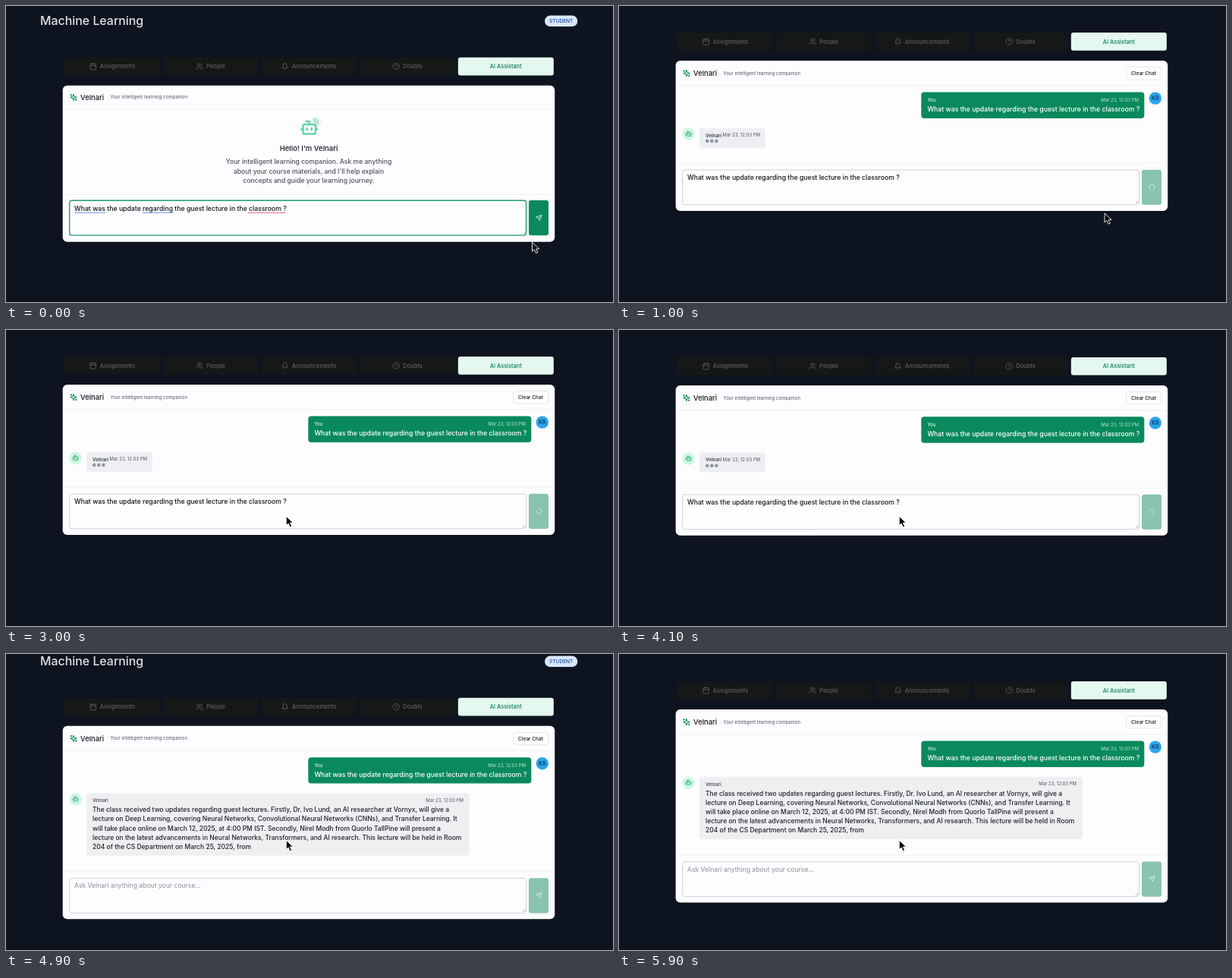
An HTML page that plays this animation: 800 px wide and 390 px high, repeating every 6000 ms.

```html
<!DOCTYPE html>
<html lang="en">
<head>
<meta charset="utf-8">
<title>Learning assistant</title>
<style>
  html, body { margin: 0; width: 100%; height: 100%; overflow: hidden; background: #0d141f; }
  svg { display: block; }
  text { font-family: Inter, "Open Sans", sans-serif; white-space: pre; }
  .icon { fill: none; stroke-linecap: round; stroke-linejoin: round; }
</style>
</head>
<body>
<svg id="stage" width="800" height="390" viewBox="0 0 800 390"></svg>
<script>
const LOOP = 6000, STEP = 100;
const SENT = 400, ANSWERED = 4800;
const BOT = "Velnari";
const DATE = "Mar 23, 12:03 PM";
const QUESTION = "What was the update regarding the guest lecture in the classroom ?";
const ANSWER = [
  "The class received two updates regarding guest lectures. Firstly, Dr. Ivo Lund, an AI researcher at Vornyx, will give a",
  "lecture on Deep Learning, covering Neural Networks, Convolutional Neural Networks (CNNs), and Transfer Learning. It",
  "will take place online on March 12, 2025, at 4:00 PM IST. Secondly, Nirel Modh from Quorlo TallPine will present a",
  "lecture on the latest advancements in Neural Networks, Transformers, and AI research. This lecture will be held in Room",
  "204 of the CS Department on March 25, 2025, from"
];

// Icon outlines on a 24 unit grid
const ICONS = {
  calendar: '<rect x="3" y="4" width="18" height="18" rx="2"/><path d="M16 2v4M8 2v4M3 10h18"/>',
  users: '<path d="M16 21v-2a4 4 0 0 0-4-4H6a4 4 0 0 0-4 4v2"/><circle cx="9" cy="7" r="4"/><path d="M22 21v-2a4 4 0 0 0-3-3.9M16 3.1a4 4 0 0 1 0 7.8"/>',
  bell: '<path d="M6 8a6 6 0 0 1 12 0c0 7 3 9 3 9H3s3-2 3-9M10.3 21a2 2 0 0 0 3.4 0"/>',
  help: '<circle cx="12" cy="12" r="10"/><path d="M9 9a3 3 0 0 1 5.8 1c0 2-2.8 3-2.8 3M12 17v.1"/>',
  bot: '<path d="M12 8V4H8M2 14h2M20 14h2M15 13v2M9 13v2"/><rect x="4" y="8" width="16" height="12" rx="2"/>',
  sparkles: '<path d="M12 3l-1.9 5.8a2 2 0 0 1-1.3 1.3L3 12l5.8 1.9a2 2 0 0 1 1.3 1.3L12 21l1.9-5.8a2 2 0 0 1 1.3-1.3L21 12l-5.8-1.9a2 2 0 0 1-1.3-1.3zM5 3v4M3 5h4M19 17v4M17 19h4"/>',
  send: '<path d="M22 2l-7 20-4-9-9-4zM22 2L11 13"/>',
  loader: '<path d="M21 12a9 9 0 1 1-6.2-8.6"/>'
};

const icon = (name, cx, cy, size, color, weight = 2) =>
  `<g class="icon" stroke="${color}" stroke-width="${weight}" transform="translate(${cx - size / 2} ${cy - size / 2}) scale(${size / 24})">${ICONS[name]}</g>`;

// y is the middle of the capital letters
const label = (x, y, str, size, color, weight = 500, anchor = "start") =>
  `<text x="${x}" y="${y + size * 0.36}" font-size="${size}" font-weight="${weight}" fill="${color}" text-anchor="${anchor}">${str}</text>`;

const box = (x, y, w, h, r, fill, stroke = "none", weight = 1) =>
  `<rect x="${x}" y="${y}" width="${w}" height="${h}" rx="${r}" fill="${fill}" stroke="${stroke}" stroke-width="${weight}"/>`;

const disc = (x, y, r, fill) => `<circle cx="${x}" cy="${y}" r="${r}" fill="${fill}"/>`;
const rule = (x, y, w, color, weight) =>
  `<path d="M${x} ${y}h${w}" stroke="${color}" stroke-width="${weight}"/>`;
const group = (id, body) => `<g id="${id}">${body}</g>`;

const tab = (x, name, title, iconX, textX) =>
  box(x, 68, 125, 23, 3, "#161717") +
  icon(name, iconX, 79.6, 10, "#5d6062") +
  label(textX, 79.6, title, 7.5, "#5d6062");

const panel = (height, headLine, footLine) =>
  box(74.7, -0.2, 648.5, height + 0.5, 6, "#fdfcfe") +
  rule(75.5, headLine, 647, "#eeeff2", 0.8) +
  rule(75.5, footLine, 647, "#eeeff2", 0.8);

const header = y =>
  icon("sparkles", 89, y, 11, "#0a8a5c", 2.2) +
  label(98, y, BOT, 9.4, "#14181f") +
  label(137.5, y, "Your intelligent learning companion", 6.1, "#4f5661", 400);

const inputBox = (y, stroke, weight, buttonColor) =>
  box(83.7, y, 601.8, 45.8, 3, "#fdfcfe", stroke, weight) +
  `<path d="M680.8 ${y + 44.3}l3.4-3.4M683 ${y + 44.3}l1.3-1.3" stroke="#777b80" stroke-width=".6"/>` +
  box(689, y - 0.2, 26, 46.2, 3, buttonColor);

const welcome =
  panel(205.5, 31, 143.5) + header(15.3) +
  disc(408.5, 47.5, 7, "#e8f8f0") +
  icon("bot", 399.7, 55.2, 25, "#62d3aa", 2.3) +
  icon("sparkles", 408.7, 47, 8.5, "#8fbfa5") +
  label(399, 82.7, `Hello! I'm ${BOT}`, 9.5, "#14181f", 500, "middle") +
  ["Your intelligent learning companion. Ask me anything",
   "about your course materials, and I'll help explain",
   "concepts and guide your learning journey."]
    .map((line, i) => label(399, 100.3 + 12.2 * i, line, 8.6, "#4b525e", 500, "middle")).join("") +
  inputBox(151.3, "#1d9f70", 1.4, "#0a8a5c") +
  label(90, 161.6, QUESTION, 8.7, "#111418") +
  rule(90, 167.4, 41, "#6f9fe0", 1) + rule(180, 167.4, 41, "#6f9fe0", 1) +
  rule(319, 167.4, 49, "#e0688c", 1) +
  icon("send", 702.3, 174.4, 8.5, "#fff");

const thread =
  header(16.3) +
  box(668.6, 8.4, 46.2, 16.2, 3, "#fefefe", "#dfe1e6", 0.8) +
  label(691.5, 16.4, "Clear Chat", 6.5, "#14181f", 500, "middle") +
  box(398.3, 41.2, 294, 34.4, 4, "#0a8a5c") +
  label(406.4, 51.4, "You", 6.1, "#e3f3ec") +
  label(685, 51.4, DATE, 6, "#c2e2d5", 400, "end") +
  label(406.4, 63.4, QUESTION, 8.7, "#fff") +
  disc(706.8, 49.3, 8.2, "#2ba5ec") +
  label(706.8, 49.3, "KR", 7, "#0f2c48", 500, "middle") +
  disc(91.7, 96.5, 8.2, "#cdf7e2") +
  icon("bot", 91.7, 96, 9, "#0d9a68");

const loading =
  panel(197.3, 32.6, 134.9) +
  box(106, 88.4, 87, 26, 4, "#eeeff2") +
  label(114, 98, BOT, 6.3, "#3c424c", 600) +
  label(136.5, 98, DATE, 6, "#4f5661", 400) +
  [0, 1, 2].map(i => group("dot" + i, disc(116.2 + 6.1 * i, 105.6, 2.3, "#9297a3"))).join("") +
  inputBox(143.7, "#cfd2d6", 1, "#88c4ae") +
  label(90, 153.6, QUESTION, 8.7, "#111418") +
  group("spinner", icon("loader", 702.3, 166.4, 9.2, "#e3f3ec"));

const answered =
  panel(254, 32.6, 191.9) +
  box(106, 88.4, 504.7, 82.2, 4, "#eeeff1") +
  label(114, 98, BOT, 6.3, "#3c424c") +
  label(603, 98, DATE, 6, "#4f5661", 400, "end") +
  ANSWER.map((line, i) => label(114, 110.2 + 12.2 * i, line, 8.5, "#1d2127")).join("") +
  inputBox(200.5, "#cfd2d6", 1, "#88c4ae") +
  label(90, 210.4, `Ask ${BOT} anything about your course...`, 8.6, "#8b909a", 400) +
  icon("send", 702.3, 223, 8.5, "#e9f6f0");

const pageTop =
  label(45, 18.9, "Machine Learning", 15.9, "#dfe2e6", 500) +
  box(710, 12.6, 43.3, 14.4, 7.2, "#d8e7fb") +
  label(731.7, 19.8, "STUDENT", 6.6, "#1d4f96", 500, "middle") +
  tab(77, "calendar", "Assignments", 114.7, 123.7) +
  tab(207, "users", "People", 255.3, 264.2) +
  tab(337, "bell", "Announcements", 367.6, 376.8) +
  tab(467, "help", "Doubts", 514.3, 523.3) +
  box(595.8, 67.8, 126, 23.6, 3, "#e5f8f0") +
  label(658.7, 79.6, "AI Assistant", 7.4, "#0a7f56", 500, "middle");

const pointer = '<path d="M0 0v12.2l2.8-2.6 2.2 4.7 2.3-1-2.2-4.6h4z" fill="#050505" stroke="#fff" stroke-width=".9" stroke-linejoin="round"/>';

const stage = document.getElementById("stage");
stage.innerHTML =
  group("page", pageTop + `<g transform="translate(0 105)">` +
    group("welcome", welcome) + group("loading", loading) +
    group("answered", answered) + group("thread", thread) + "</g>") +
  group("pointer", pointer);
const el = id => document.getElementById(id);

// [time, value...]
const SCROLL = [
  [0, 0], [400, 0], [500, -4.5], [600, -13.6], [700, -32.7], [3500, -32.7], [4200, -31.7],
  [4300, -27], [4400, -20], [4500, -15.3], [4700, -11.5], [4900, -10],
  [5000, -14], [5100, -22], [5200, -30.5], [5400, -30.5], [5900, -31.7]
];
const POINTER = [
  [0, 693.5, 311.3], [300, 704, 280], [400, 706, 276.5], [600, 706.5, 276.3], [800, 705, 280],
  [1000, 640, 273], [1200, 480, 258], [1400, 386, 248], [1600, 369.3, 245.4]
];

function at(track, t) {
  const i = track.findIndex(key => key[0] > t);
  if (i < 0) return track[track.length - 1].slice(1);
  const [a, b] = [track[i - 1], track[i]];
  const k = (t - a[0]) / (b[0] - a[0]);
  return a.slice(1).map((v, n) => v + (b[n + 1] - v) * k);
}

const move = (id, x, y) => el(id).setAttribute("transform", `translate(${x} ${y})`);
const show = (id, on) => el(id).setAttribute("display", on ? "inline" : "none");

function draw(t) {
  move("page", 0, at(SCROLL, t)[0]);
  move("pointer", ...at(POINTER, t));
  show("welcome", t < SENT);
  show("loading", t >= SENT && t < ANSWERED);
  show("thread", t >= SENT);
  show("answered", t >= ANSWERED);

  const beat = (t % 1000) / 1000;
  for (let i = 0; i < 3; i++) {
    const off = Math.abs(beat - 0.56 + 0.1 * i);
    move("dot" + i, 0, off < 0.2 ? -1.2 * Math.cos(off / 0.2 * Math.PI / 2) : 0);
  }
  const angle = 30 + (t - 600) * 0.248;
  el("spinner").setAttribute("transform", `rotate(${angle} 702.3 166.4)`);
}

function tick() {
  const t = performance.now() % LOOP;
  draw(Math.floor(t / STEP) * STEP);
  requestAnimationFrame(tick);
}
tick();
</script>
</body>
</html>
```
